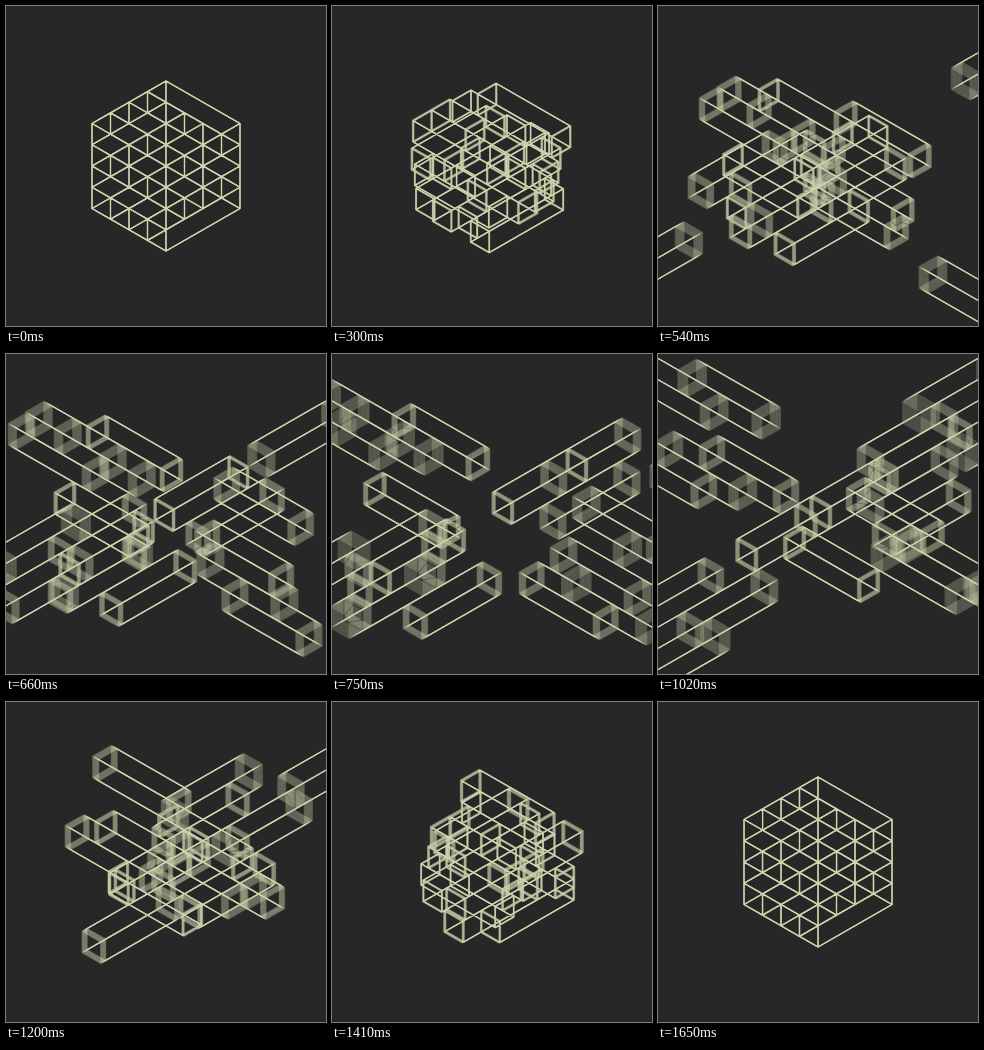
An HTML page with a canvas for the animation above (1.83 s loop, 320 by 320 pixels).

```html
<!DOCTYPE html>
<html>
<head>
<meta charset="utf-8">
<style>
html, body { margin: 0; height: 100%; overflow: hidden; background: #272727; }
canvas { display: block; width: 320px; height: 320px; }
</style>
</head>
<body>
<canvas id="stage"></canvas>
<script>
const SIZE = 320, LOOP = 1830, STEP = 30;
const START = 120, TRAVEL = 1560, LAYER_LEAD = 45;
const SHUTTER = 24, SAMPLES = 14, SAMPLE_ALPHA = 0.2;
const UNIT_X = 18.5, UNIT_Y = 10.625, LENGTH = 4;

// One reach per bar, layer by layer; the sign is the side the bar leaves by.
const reach = [
  1045, -610, -1210, -1190,
  -1485, -885, 390, -1380,
  -1085, 840, 1105, -443,
  -473, -885, 895, -680
];

const canvas = document.getElementById('stage');
const ctx = canvas.getContext('2d');
const scale = Math.min(2, window.devicePixelRatio || 1);
canvas.width = canvas.height = SIZE * scale;
ctx.scale(scale, scale);
ctx.lineWidth = 1.2;
ctx.lineJoin = ctx.lineCap = 'round';
ctx.strokeStyle = '#d6dab6';
ctx.fillStyle = '#272727';

const ease = u => Math.pow(u, 2.55);

const project = (x, y, z) => [
  160 + (x - y) * UNIT_X,
  75 + (x + y) * UNIT_Y + z * 2 * UNIT_Y
];

// Even layers run along x, odd layers along y.
function addBar(layer, index, offset) {
  const even = layer % 2 === 0;
  const shift = offset / UNIT_X * (even ? 1 : -1);
  const corner = (along, side, drop) => even
    ? project(along + shift, index + side, layer + drop)
    : project(index + side, along + shift, layer + drop);
  const ring = [[0, 0], [1, 0], [1, 1], [0, 1]];
  for (const end of [0, LENGTH]) {
    ring.forEach(([s, d], k) => ctx[k ? 'lineTo' : 'moveTo'](...corner(end, s, d)));
    ctx.closePath();
  }
  for (const [s, d] of ring) {
    ctx.moveTo(...corner(0, s, d));
    ctx.lineTo(...corner(LENGTH, s, d));
  }
}

// Each bar speeds away on one side while its double slows in from the other.
function strokeInstant(time) {
  ctx.beginPath();
  reach.forEach((distance, bar) => {
    const layer = Math.floor(bar / 4), index = bar % 4;
    const lead = layer === 2 ? LAYER_LEAD : 0;
    const u = Math.min(1, Math.max(0, (time + lead - START) / TRAVEL));
    if (u < 1) addBar(layer, index, distance * ease(u));
    if (u > 0) addBar(layer, index, -distance * ease(1 - u));
  });
  ctx.stroke();
}

// Layers several faint instants for motion blur.
function render(time) {
  ctx.globalAlpha = 1;
  ctx.fillRect(0, 0, SIZE, SIZE);
  ctx.globalAlpha = SAMPLE_ALPHA;
  for (let k = 0; k < SAMPLES; k++) {
    strokeInstant(time + SHUTTER * ((k + 0.5) / SAMPLES - 0.5));
  }
}

let origin = null;
function tick(now) {
  if (origin === null) origin = now;
  const time = Math.max(0, now - origin) % LOOP;
  render(Math.floor(time / STEP) * STEP);
  requestAnimationFrame(tick);
}
render(0);
requestAnimationFrame(tick);
</script>
</body>
</html>
```
